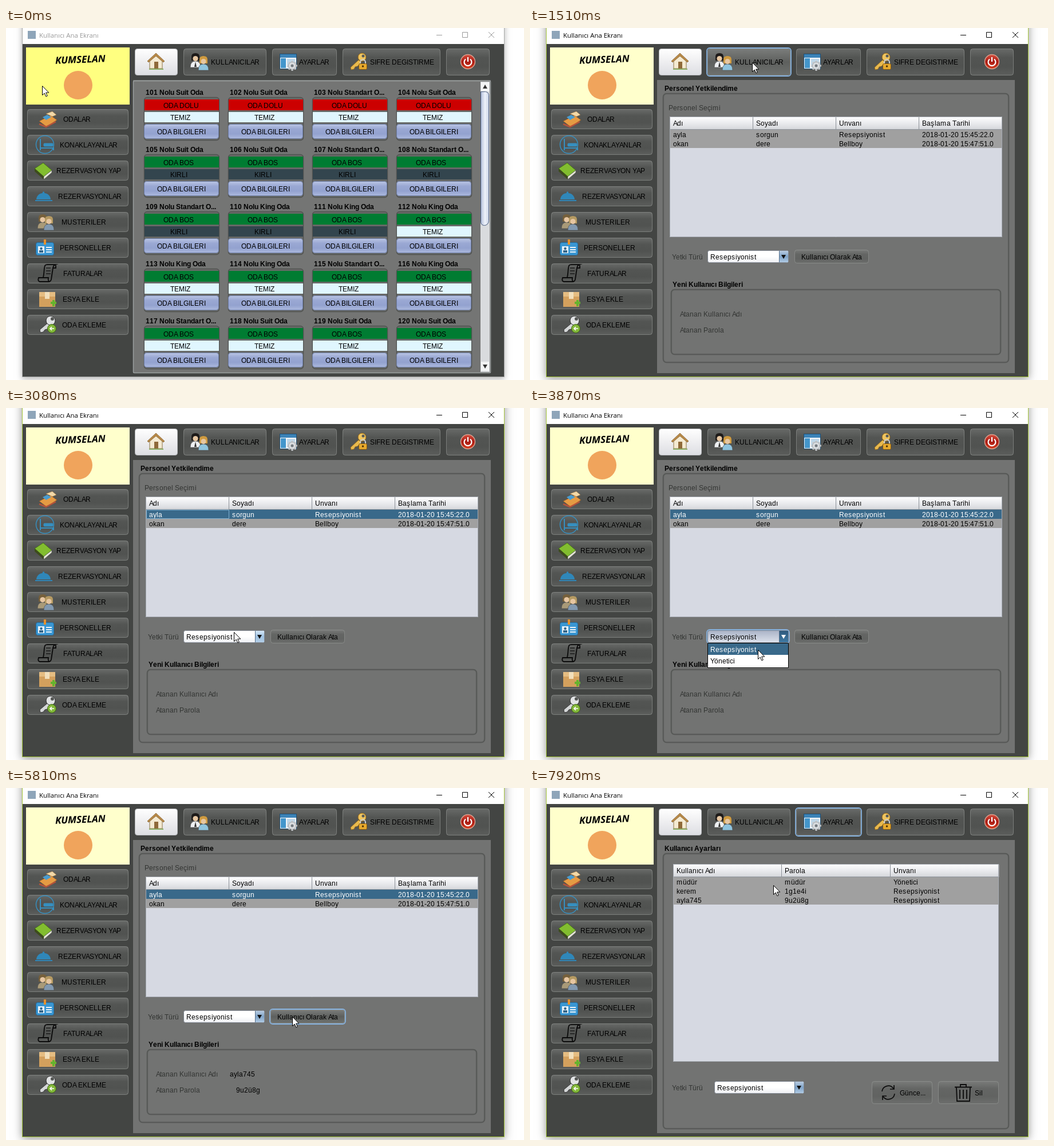
An HTML page with a canvas that plays this animation: 905x616 px, repeating every 8 s.

```html
<!DOCTYPE html>
<html lang="tr">
<head>
<meta charset="utf-8">
<style>
html, body { margin: 0; width: 905px; height: 616px; overflow: hidden; background: #fff }
canvas { display: block }
</style>
</head>
<body>
<canvas id="stage" width="905" height="616"></canvas>
<script>
const ctx = document.getElementById('stage').getContext('2d');
const LOOP = 8000;
const BLUE = '#39698a', DIM = '#333533', RING = '#86b2df', PANEL = '#727372';
let mouse = { x: 0, y: 0 };

// ---- drawing helpers ----
function rect(fill, x, y, w, h) {
  ctx.fillStyle = fill;
  ctx.fillRect(x, y, w, h);
}

function ramp(y, h, ...colors) {
  const g = ctx.createLinearGradient(0, y, 0, y + h);
  colors.forEach((c, i) => g.addColorStop(i / (colors.length - 1), c));
  return g;
}

function paint(path, fill, stroke, width = 1) {
  if (fill) { ctx.fillStyle = fill; ctx.fill(path); }
  if (stroke) { ctx.strokeStyle = stroke; ctx.lineWidth = width; ctx.stroke(path); }
}

function round(x, y, w, h, r, ...style) {
  const path = new Path2D();
  path.roundRect(x + .5, y + .5, w - 1, h - 1, r);
  paint(path, ...style);
}

function circle(x, y, r, ...style) {
  const path = new Path2D();
  path.arc(x, y, r, 0, 7);
  paint(path, ...style);
}

const shape = (d, ...style) => paint(new Path2D(d), ...style);

// UI text with whole-pixel glyph advances
const advances = {};
function advance(ch, bold) {
  const hint = bold ? 0 : /[smş]/.test(ch) ? 1 : /[AVY]/.test(ch) ? -1 : 0;
  return advances[ch + bold] ??= Math.round(ctx.measureText(ch).width) + hint;
}
function text(s, x, y, color = '#000', bold = false) {
  ctx.font = (bold ? 'bold ' : '') + '12px "Liberation Sans", Arial, sans-serif';
  ctx.fillStyle = color;
  for (const ch of s) {
    ctx.fillText(ch, x, y);
    x += advance(ch, bold);
  }
}

const over = (x, y, w, h) =>
  mouse.x >= x && mouse.x < x + w && mouse.y >= y && mouse.y < y + h;

// ---- widgets ----
function focusRing(x, y, w, h) {
  round(x - 1.5, y - 1.5, w + 3, h + 3, 5, null, RING, 1.8);
}

function button(x, y, w, h, focus, pressed) {
  const fill = pressed ? ramp(y, h, '#202226', '#2c2f33', '#45494e')
    : over(x, y, w, h) ? ramp(y, h, '#7b7d7b', '#5e605e', '#6e716e')
    : ramp(y, h, 'rgba(126,128,126,.64)', 'rgba(92,94,92,.64)', 'rgba(88,90,88,.64)', 'rgba(106,108,106,.64)');
  round(x, y, w, h, 4, fill, 'rgba(150,153,150,.65)');
  if (focus) focusRing(x, y, w, h);
}

function combo(x, y, w, h, label, focus, open) {
  const hot = over(x, y, w, h);
  round(x, y, w, h, 3, open ? ramp(y, h, '#a9b2c6', '#dde2ec') : ramp(y, h, '#fff', '#fff', '#eceef2'), '#7e858f');
  const ax = x + w - 17;
  rect(open ? ramp(y, h, '#2d587c', '#3f7aa4')
    : ramp(y, h, hot ? '#dcecfa' : '#bed0e4', hot ? '#9fc2e2' : '#7fa3c8', '#b4cee6'), ax, y + 1, 16, h - 2);
  rect('#59718c', ax, y + 1, 1, h - 2);
  shape(`M${ax + 4} ${y + 8}h8l-4 7z`, open ? '#fff' : '#111');
  text(label, x + 5, y + 16);
  if (focus) focusRing(x, y, w, h);
}

function group(title, x, y, w, h) {
  text(title, x + 3, y - 4, '#000', true);
  round(x, y, w, h, 6, null, '#565856', 1.5);
  round(x + 1, y + 1, w - 2, h - 2, 5, null, 'rgba(70,72,70,.35)', 1.5);
}

function table(x, y, w, h, headers, rows, selected) {
  const col = (w - 1) / headers.length;
  rect('#d6d9e2', x, y, w, h);
  headers.forEach((label, i) => {
    const cx = Math.round(x + 1 + i * col);
    const hot = over(cx, y + 1, col, 21);
    rect(ramp(y, 22, '#fff', hot ? '#d5e6f5' : '#ebecef', hot ? '#b9d3ea' : '#d6d8dc'), cx, y + 1, col, 22);
    if (i) rect('#8b9097', cx - 1, y + 1, 1, 22);
    text(label, cx + 5, y + 16);
  });
  rect('#8f959d', x, y + 22, w, 1);
  rows.forEach((row, r) => {
    const top = y + 23 + r * 16;
    rect(r === selected ? BLUE : '#a0a0a0', x + 1, top, w - 2, 16);
    row.forEach((cell, i) =>
      text(cell, Math.round(x + 1 + i * col) + 5, top + 13, r === selected ? '#fff' : '#000'));
  });
  round(x, y, w, h, 0, null, '#a5aab2');
}

// ---- icons ----
function person(x, y, hair, body) {
  shape(`M${x - 9} ${y + 17}q0-11 9-11t9 11z`, body, '#4b4b4b', .6);
  shape(`M${x - 7} ${y + 5}v-7q0-6 7-6t7 6v7z`, hair);
  circle(x, y + 1.5, 4.6, '#e6c6a2');
}

function topIcons() {
  shape('M251 57l11-10 11 10v14h-22z', '#f4ead2', '#8d7446');
  shape('M247 58l15-14 15 14-2 2-13-11-13 11z', '#b98a48', '#7b5a2c', .7);
  rect('#8f6a39', 259, 59, 7, 12);
  rect('#8cae66', 250, 71, 25, 2);

  person(331, 52, '#1d1a19', '#eef0f2');
  shape('M331 59l-2 9h4z', '#333');
  person(345, 57, '#cf9a3f', '#8fc4df');

  rect('#1f4f73', 478, 45, 30, 27);
  rect('#3b83b8', 479, 46, 28, 6);
  rect('#f3f6f8', 479, 52, 28, 19);
  rect('#4396cc', 480, 53, 9, 17);
  rect('#bcd6e8', 491, 54, 14, 15);
  for (let i = 0; i < 8; i++) {
    const a = i * Math.PI / 4;
    circle(500 + 7 * Math.cos(a), 66 + 7 * Math.sin(a), 2, '#c9cdd0');
  }
  circle(500, 66, 6.5, '#d9dcdf', '#8b9094', .7);
  circle(500, 66, 2.5, '#737a80');

  shape('M616 56l-14 13 1 4 5-1 2-4 4-1 7-7z', '#e8b94e', '#936415', .8);
  circle(622, 51, 7, '#efc45f', '#936415');
  circle(624, 49, 2.5, '#5a5c5a');
  shape('M619 63v-3a4.5 4.5 0 0 1 9 0v3', null, '#c9cdd1', 2);
  round(616, 62, 15, 11, 2, '#e6a92e', '#87590f');
  circle(623.5, 67, 1.7, '#4a3004');

  circle(807, 59, 12.5, ramp(46, 26, '#d8503f', '#a81a12', '#d8401f'), '#d9a090', 1.5);
  shape('M803 54.5a6.5 6.5 0 1 0 8 0M807 51v8', null, '#fff', 2.2);
}

function sideIcons() {
  shape('M58 163l20-10 11 8-18 12z', '#e69b43', '#8f5520', .7);
  shape('M64 156l8-4 7 4-9 5z', '#4a9cd0');
  shape('M70 150l11-4 7 6-7 3z', '#f2d8a8', '#a77b3f', .6);
  shape('M58 168l12 5 17-9', null, '#b6533b', 2.5);

  circle(68, 204, 15.5, null, '#368fbf', 1.5);
  shape('M60 194v20M60 210h23v4', null, '#368fbf', 2);
  round(65, 201, 18, 7, 2, '#368fbf');

  shape('M50 246l15-10 15 13-14 11z', '#82bd2f', '#44701a');
  shape('M50 246l16 14v5l-16-14z', '#3d4c1c');
  shape('M66 260l14-11v4l-14 12z', '#e6e8d8', '#555', .6);

  shape('M53 300c1-15 24-15 25 0z', '#2f87b9');
  rect('#2f87b9', 51, 301, 30, 2);
  circle(65.5, 288, 1.8, '#2f87b9');

  person(64, 334, '#76603b', '#a99a78');
  person(75, 337, '#b59a62', '#8299b0');

  round(52, 375, 32, 23, 3, '#3a97d3', '#1f6da3');
  rect('#e5912c', 66, 370, 4, 9);
  rect('#e9f2f8', 56, 382, 11, 12);
  circle(61.5, 386, 2.2, '#33668a');
  rect('#33668a', 58, 389, 7, 4);
  [383, 387, 391].forEach(y => rect('#e9f2f8', 70, y, 10, 2));

  shape('M65 436c2-6 1-15 3-20q1-2 4-2h14q-3 1-4 6l-3 20q-1 4-5 4H59q-4-1-2-7h17q-1 6 2 7M82 420h5v-3q0-3-2-3',
    null, '#0c0c0c', 1.9);
  [420, 425, 430].forEach(y => shape(`M70 ${y}h8`, null, '#0c0c0c', 1.2));

  rect('#d3a05d', 58, 462, 28, 26);
  rect('#e5bd82', 58, 462, 28, 8);
  rect('#f1dfbc', 68, 462, 8, 12);
  shape('M78 481h10M83 476v11', null, '#65b32e', 4);

  shape('M72 517l-13 11 1 5 5-1 3-4 4-1 6-6z', '#d4d6d7', '#303030', .9);
  circle(78, 512, 8, '#e0e2e3', '#303030');
  circle(81, 509, 3, '#565856');
  circle(80, 526, 7.5, '#83b83a', '#3d6512');
  shape('M84 526h-7m3-3l-3 3 3 3', null, '#fff', 1.7);
}

// ---- window ----
const sideLabels = [['ODALAR', 100], ['KONAKLAYANLAR', 94], ['REZERVASYON YAP', 88],
  ['REZERVASYONLAR', 91], ['MUSTERILER', 97], ['PERSONELLER', 94],
  ['FATURALAR', 100], ['ESYA EKLE', 99], ['ODA EKLEME', 98]];

function drawWindow(active) {
  rect('#fff', 0, 0, 905, 616);
  ctx.save();
  ctx.shadowColor = active ? 'rgba(0,0,0,.42)' : 'rgba(0,0,0,.3)';
  ctx.shadowBlur = active ? 15 : 10;
  ctx.shadowOffsetY = 3;
  rect(active ? '#a5c63b' : '#a9aaa9', 28, -20, 843, 631);
  ctx.restore();
  rect('#fff', 29, 0, 841, 28);
  rect('#434543', 29, 28, 841, 582);

  const ink = active ? '#000' : '#999';
  rect('#8ea5b9', 38, 5, 14, 14);
  ctx.font = '11.4px "Open Sans", "Noto Sans", sans-serif';
  ctx.fillStyle = ink;
  ctx.fillText('Kullanıcı Ana Ekranı', 58, 17);
  shape('M752 12.5h10M797.5 7.5h9v9h-9zM843 7l10 10M853 7l-10 10', null, ink);
}

function drawNavigation(t) {
  rect(over(35, 34, 181, 100) ? '#ffff80' : '#ffffcc', 35, 34, 181, 100);
  circle(126, 100, 25, '#f0a45c');
  ctx.save();
  ctx.translate(130, 61);
  ctx.rotate(-.04);
  ctx.font = 'italic bold 17px "Noto Sans", sans-serif';
  ctx.textAlign = 'center';
  ctx.fillStyle = '#000';
  ctx.fillText('KUMSELAN', 0, 0);
  ctx.restore();

  sideLabels.forEach(([label, x], i) => {
    button(37, 142 + i * 45, 177, 35);
    text(label, x, 164 + i * 45);
  });
  sideIcons();

  round(225, 36, 75, 47, 4, ramp(36, 47, '#fff', '#eeeef0', '#dcdde2'), '#b5b7ba');
  button(310, 36, 145, 47, t >= 1210 && t < 2310, t >= 1210 && t < 1360);
  button(465, 36, 113, 47, t >= 7230, t >= 7230 && t < 7290);
  button(588, 36, 171, 47);
  button(769, 36, 76, 47);
  topIcons();
  text('KULLANICILAR', 358, 64);
  text('AYARLAR', 512, 64);
  text('SIFRE DEGISTIRME', 636, 64);
}

// ---- pages ----
const roomKinds = 'SSTSSSTTTKKKKKTKTSSS';
const kindNames = { S: 'Suit Oda', T: 'Standart O...', K: 'King Oda' };

function drawRooms() {
  rect('#747574', 222, 91, 625, 513);
  round(222, 92, 625, 512, 2, null, '#9a9f9f', 1.5);
  [...roomKinds].forEach((kind, i) => {
    const x = 241 + i % 4 * 147, y = 100 + Math.floor(i / 4) * 100;
    const full = i < 4, dirty = i > 3 && i < 11;
    text(`${101 + i} Nolu ${kindNames[kind]}`, x + 3, y + 17, '#000', true);
    round(x, y + 21, 132, 76, 5, '#676967', '#515351', 1.5);
    rect(full ? '#cc0000' : '#007c32', x + 1, y + 25, 130, 19);
    rect(dirty ? '#33454e' : '#e0f6fe', x + 1, y + 47, 130, 18);
    round(x, y + 68, 131, 26, 4, ramp(y + 68, 26, '#bcc7e6', '#9aa8d3', '#93a2cf', '#adbadf'), '#7080a8');
    text(full ? 'ODA DOLU' : 'ODA BOS', x + 34, y + 40);
    text(dirty ? 'KIRLI' : 'TEMIZ', x + 46, y + 61);
    text('ODA BILGILERI', x + 23, y + 86);
  });

  rect('#d9dbde', 829, 94, 16, 508);
  rect('#f3f4f5', 830, 95, 14, 16);
  rect('#f3f4f5', 830, 584, 14, 16);
  shape('M833 106h8l-4-7zM833 589h8l-4 7z', '#333');
  const g = ctx.createLinearGradient(829, 0, 845, 0);
  ['#aebbd8', '#eef2fa', '#c3cee4'].forEach((c, i) => g.addColorStop(i / 2, c));
  round(829, 111, 15, 235, [0, 6, 8, 6], g, '#46587a');
}

function drawStaff(t) {
  rect(PANEL, 222, 91, 625, 513);
  group('Personel Yetkilendime', 232, 114, 605, 472);
  text('Personel Seçimi', 242, 144, DIM);
  table(244, 155, 581, 211, ['Adı', 'Soyadı', 'Unvanı', 'Başlama Tarihi'], [
    ['ayla', 'sorgun', 'Resepsiyonist', '2018-01-20 15:45:22.0'],
    ['okan', 'dere', 'Bellboy', '2018-01-20 15:47:51.0']
  ], t >= 2310 ? 0 : -1);
  if (t >= 2310 && t < 3310) round(245, 178, 145, 16, 0, null, '#7fb1d3');

  const open = t >= 3310 && t < 4320;
  text('Yetki Türü', 248, 405, DIM);
  combo(310, 389, 142, 22, 'Resepsiyonist', t >= 3310 && t < 5120, open);
  button(462, 388, 130, 24, t >= 5120 && t < 7230, t >= 5120 && t < 5290);
  text('Kullanıcı Olarak Ata', 474, 405);

  group('Yeni Kullanıcı Bilgileri', 246, 457, 577, 115);
  text('Atanan Kullanıcı Adı', 262, 505, DIM);
  text('Atanan Parola', 262, 533, DIM);
  if (t >= 5290) {
    text('ayla745', 391, 505);
    text('9u2ü8g', 402, 533);
  }

  if (open) {
    round(310, 411, 142, 44, 0, '#fff', '#000');
    rect(BLUE, 311, 412, 140, 20);
    text('Resepsiyonist', 315, 427, '#fff');
    text('Yönetici', 315, 447);
  }
}

function drawSettings() {
  rect(PANEL, 222, 91, 625, 513);
  group('Kullanıcı Ayarları', 232, 114, 605, 483);
  table(250, 133, 569, 346, ['Kullanıcı Adı', 'Parola', 'Unvanı'], [
    ['müdür', 'müdür', 'Yönetici'],
    ['kerem', '1g1e4i', 'Resepsiyonist'],
    ['ayla745', '9u2ü8g', 'Resepsiyonist']
  ], -1);
  text('Yetki Türü', 248, 529, DIM);
  combo(322, 513, 157, 22, 'Resepsiyonist');
  button(597, 513, 106, 40);
  button(713, 513, 106, 40);
  text('Günce...', 646, 538);
  text('Sil', 777, 538);
  shape('M615 531a11 11 0 0 1 20-5m1-6v7h-7M637 535a11 11 0 0 1-20 5m-1 6v-7h7', null, '#0c0c0c', 1.7);
  shape('M742 523.5h30M752 523v-4h10v4M745 524l1 24h22l1-24M751 528v16M757 528v16M763 528v16', null, '#0c0c0c', 1.8);
}

// ---- pointer: start, end, number of steps, target ----
const moves = [
  [240, 730, 8, 391, 54], [1510, 2070, 8, 316, 190], [2470, 2930, 7, 398, 384],
  [3080, 3160, 2, 398, 399], [3720, 3870, 3, 398, 423], [4320, 4570, 4, 500, 406],
  [5810, 5810, 1, 500, 400], [5880, 6510, 9, 539, 67], [7610, 7920, 5, 425, 170]
];

function pointerAt(t) {
  let x = 63, y = 101;
  for (const [start, end, steps, tx, ty] of moves) {
    if (t < start) break;
    const done = steps > 1 ? Math.floor((t - start) / (end - start) * (steps - 1) + 1.001) : 1;
    const p = Math.min(1, done / steps);
    const eased = p * p * (3 - 2 * p);
    x += (tx - x) * eased;
    y += (ty - y) * eased;
  }
  return { x: Math.round(x), y: Math.round(y) };
}

function drawPointer() {
  ctx.save();
  ctx.translate(mouse.x + .5, mouse.y + .5);
  shape('M0 0V16L3.7 12.6 6.4 18.4 8.8 17.3 6.2 11.6H11.3z', '#fff', '#000');
  ctx.restore();
}

function render(t) {
  mouse = pointerAt(t);
  drawWindow(t >= 1210);
  drawNavigation(t);
  if (t < 1360) drawRooms();
  else if (t < 7290) drawStaff(t);
  else drawSettings();
  drawPointer();
}

const began = performance.now();
function tick() {
  render((performance.now() - began) % LOOP);
  requestAnimationFrame(tick);
}
tick();
</script>
</body>
</html>
```
